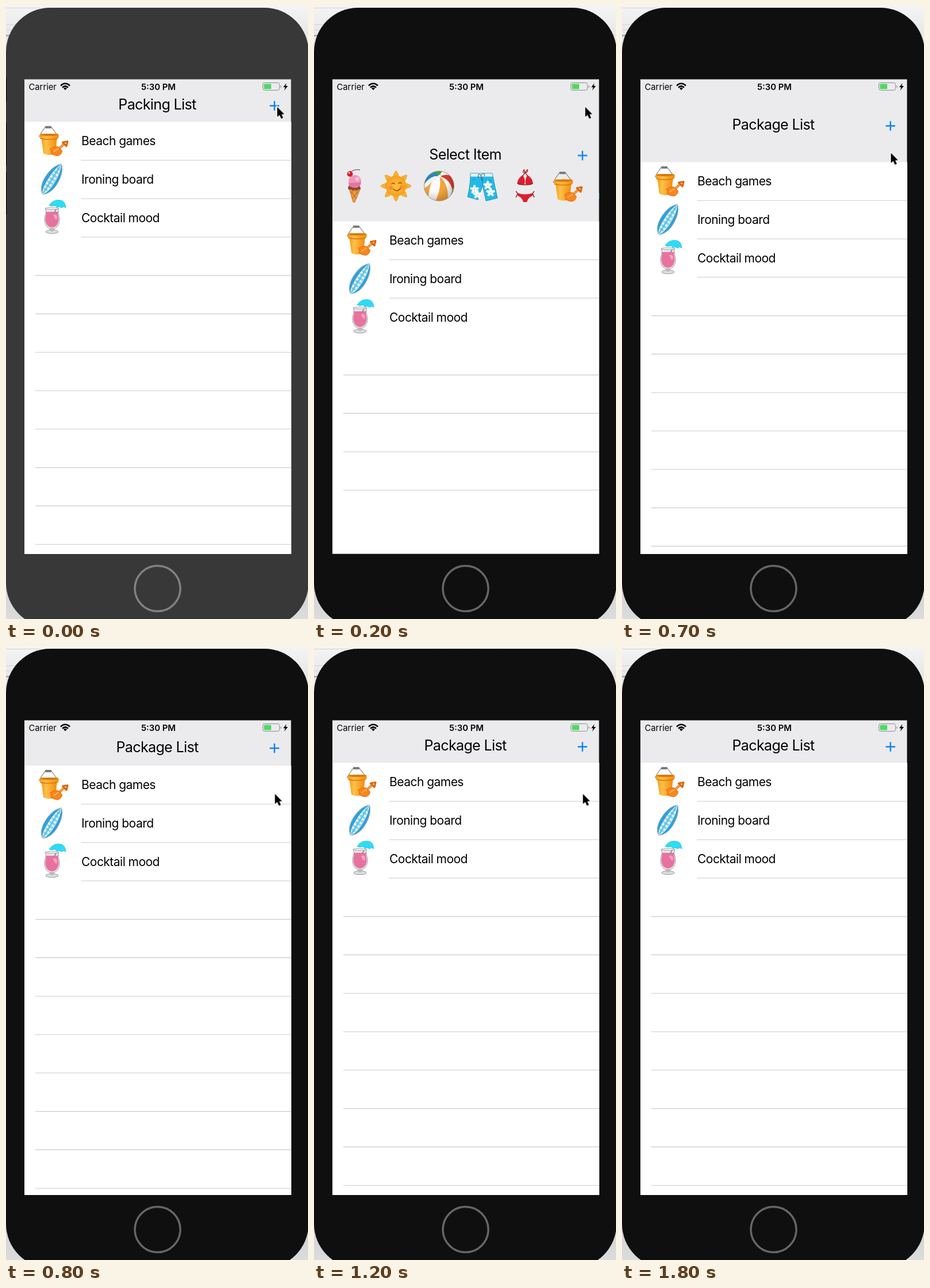
An HTML page that plays this animation: 525x1066 px, repeating every 2000 ms.

```html
<!DOCTYPE html>
<html lang="en">
<head>
<meta charset="utf-8">
<title>Packing List</title>
<style>
  @property --open { syntax: "<length>"; inherits: true; initial-value: 0px; }

  html, body { margin: 0; width: 100%; height: 100%; overflow: hidden; background: #e9e9e9; }
  svg { display: block; width: 100vw; height: 100vh; font-family: Inter, Roboto, sans-serif; }

  .screen { animation: open 2s step-end infinite; }
  .list { transform: translateY(var(--open)); }
  .bar { transform: translateY(calc(var(--open) / 2)); }

  .shell { fill: #0f0f0f; animation: shell 2s step-end infinite; }
  .ring { fill: none; stroke: #666; stroke-width: 3.5; animation: ring 2s step-end infinite; }
  .first { animation: first 2s step-end infinite; }
  .select { animation: select 2s step-end infinite; }
  .last { animation: last 2s step-end infinite; }
  .tray { animation: tray 2s step-end infinite; }
  .third { animation: third 2s step-end infinite; }
  .tail { animation: tail 2s step-end infinite; }
  .cursor { animation: cursor 2s infinite; }

  .title { font-size: 25px; letter-spacing: -.025em; text-anchor: middle; }
  .row { font-size: 21px; letter-spacing: -.025em; }
  .status { font-size: 14.8px; }
  .rule { fill: none; stroke: #cbcacd; stroke-width: 1.1; }

  @keyframes open {
    0% { --open: 0px; }
    5% { --open: 73px; }
    10% { --open: 173px; }
    35% { --open: 70px; }
    40% { --open: 5px; }
    45%, 100% { --open: 0px; }
  }
  @keyframes shell { 0% { fill: #383838; } 5%, 100% { fill: #0f0f0f; } }
  @keyframes ring { 0% { stroke: #818181; } 5%, 100% { stroke: #666; } }
  @keyframes first { 0% { opacity: 1; } 5%, 100% { opacity: 0; } }
  @keyframes select { 0% { opacity: 0; } 5% { opacity: 1; } 35%, 100% { opacity: 0; } }
  @keyframes last { 0% { opacity: 0; } 35%, 100% { opacity: 1; } }
  @keyframes tray { 0% { opacity: 0; } 10% { opacity: 1; } 35%, 100% { opacity: 0; } }
  @keyframes third { 0% { opacity: 1; } 5% { opacity: 0; } 35%, 100% { opacity: 1; } }
  @keyframes tail { 0% { opacity: 1; } 10% { opacity: 0; } 35%, 100% { opacity: 1; } }
  @keyframes cursor {
    0% { transform: translate(471.5px, 175.5px); animation-timing-function: step-end; }
    10% { transform: translate(471.5px, 175.5px); animation-timing-function: steps(4, end); }
    30% { transform: translate(467.5px, 255.5px); animation-timing-function: step-end; }
    70% { transform: translate(467.5px, 255.5px); animation-timing-function: steps(4, end); }
    90%, 100% { transform: translate(450px, 1090px); animation-timing-function: step-end; }
  }
</style>
</head>
<body>
<svg viewBox="0 0 525 1066" preserveAspectRatio="none">
  <defs>
    <clipPath id="glass"><path d="M32 127.500H495.500V952.500H32z"/></clipPath>
    <clipPath id="round"><circle r="26"/></clipPath>
    <linearGradient id="desk" x2="0" y2="1">
      <stop stop-color="#f4f4f4"/><stop offset=".06" stop-color="#e4e4e4"/>
      <stop offset=".93" stop-color="#cfcfcf"/><stop offset="1" stop-color="#dcdcdc"/>
    </linearGradient>
    <linearGradient id="pail">
      <stop stop-color="#f59a12"/><stop offset=".3" stop-color="#ffc04a"/><stop offset="1" stop-color="#f08c0c"/>
    </linearGradient>
    <radialGradient id="sunny"><stop stop-color="#ffc53a"/><stop offset="1" stop-color="#f7a01e"/></radialGradient>
    <radialGradient id="shade" cx=".4" cy=".35" r=".7">
      <stop offset=".5" stop-color="#000" stop-opacity="0"/><stop offset="1" stop-color="#000" stop-opacity=".22"/>
    </radialGradient>
    <pattern id="petals" width="7" height="7" patternUnits="userSpaceOnUse">
      <path d="M1 3.500h5M3.500 1v5" stroke="#fff" stroke-width="1.700"/>
    </pattern>
    <g id="flower" fill="#f4fcff">
      <ellipse id="leaf" cy="-4" rx="2.300" ry="4"/>
      <use href="#leaf" transform="rotate(72)"/><use href="#leaf" transform="rotate(144)"/>
      <use href="#leaf" transform="rotate(216)"/><use href="#leaf" transform="rotate(288)"/>
      <circle r="1.200" fill="#f5d36a"/>
    </g>

    <g id="bucket">
      <path d="M2 20Q4 15 12 4H24Q30 12 35 19" fill="none" stroke="#777" stroke-width="1.100"/>
      <rect x="12.500" y="1.300" width="11" height="4" rx="1.200" fill="#777"/>
      <path d="M5.500 19H33.500L30.500 49Q20 54 9.500 49z" fill="url(#pail)"/>
      <rect x="3" y="14.500" width="33" height="8.500" rx="3" fill="url(#pail)"/>
      <ellipse cx="19.500" cy="16.500" rx="15" ry="2" fill="#d9790a"/>
      <path d="M4 23Q19 26 34 23" fill="none" stroke="#dd7a0c" stroke-width="1.300"/>
      <g stroke-linejoin="round" stroke="#dd680a" fill="none">
        <path d="M36 41L46 32" stroke-width="4"/><path d="M36 41L46 32" stroke="#ff9d38" stroke-width="2.400"/>
        <path d="M43 29.500L51.500 28 49.500 36z" stroke-width="3.200"/>
        <path d="M21.500 41Q28 36 35 37.500L42 44Q42 50 35 53Q28 53 23 49Q25 44 21.500 41z" fill="#f8861e"/>
      </g>
      <path d="M27 46L36 40" stroke="#ffb35e" stroke-width="2"/>
    </g>

    <g id="surf" transform="rotate(32)">
      <path d="M0-31C9-23 12-9 12 3C12 17 7 27 0 31C-7 27-12 17-12 3C-12-9-9-23 0-31z" fill="#319fdb" stroke="#9eb2bc"/>
      <path d="M0-30C5-20 6.500-9 6.500 3C6.500 17 4 26 0 30C-4 26-5.500 17-5.500 3C-5.500-9-4-20 0-30z" fill="#74cde4"/>
      <path d="M0-30C5-20 6.500-9 6.500 3C6.500 17 4 26 0 30C-4 26-5.500 17-5.500 3C-5.500-9-4-20 0-30z" fill="url(#petals)" stroke="#e8f7fb" stroke-width=".9"/>
      <path d="M0-29V29" stroke="#4baed0" stroke-width=".8"/>
    </g>

    <g id="drink">
      <path d="M0 10L11-10" stroke="#777" stroke-width="1.300"/>
      <path d="M-5-20Q2-32 16-29Q23-27 24-16L20-18 17-16 12-18 9-17 5-20 0-19z" fill="#2cdcf6" stroke="#18b9d8" stroke-width=".7"/>
      <path d="M-12-15C-8-6-14-4-13 6C-12 17-6 19-3 21V25H3V21C6 19 12 17 13 6C14-4 8-6 12-15z" fill="#e5e4e7" stroke="#999" stroke-width=".9"/>
      <path d="M-11-9C-9-5-12-2-11.500 6C-10 14-6 18 0 18S10 14 11.500 6C12-2 9-5 11-9z" fill="#e8729f"/>
      <path d="M2-4Q7-6 9-1L8 5Q4 3 2-4z" fill="#f4a5c2"/>
      <path d="M4-8L9-17" stroke="#888" stroke-width="1.600"/>
      <ellipse cy="-15" rx="12" ry="1.700" fill="#f1f1f3" stroke="#999" stroke-width=".8"/>
      <ellipse cy="25.500" rx="11" ry="3.200" fill="#dedede" stroke="#999"/>
      <path d="M-3 19H3L2 25H-2z" fill="#bbb"/>
    </g>

    <g id="cone">
      <path d="M-8 5H12L2 29Q0 30-1 29z" fill="#e99a3d" stroke="#b86620" stroke-width=".8"/>
      <path d="M-5 10L5 23M0 6L8 15M9 8L-2 22M3 6L-5 14" stroke="#b86620" stroke-width="1"/>
      <path d="M-10 5Q-10-2 0-2T12 4Q12 8 8 7Q5 11 2 7Q-2 11-4 7Q-9 9-10 5z" fill="#8a4a32"/>
      <circle cx="2" cy="-7" r="11" fill="#f196b8"/>
      <path d="M-9-4Q-7 6-3 1Q1 7 5 1Q11 5 13-5z" fill="#e6739f"/>
      <circle cx="6" cy="-11" r="3.500" fill="#fac5d8"/>
      <path d="M-6-22Q0-29 11-27" fill="none" stroke="#5d2b25" stroke-width="1"/>
      <circle cx="-6.500" cy="-20" r="5" fill="#d6202f"/><circle cx="-8" cy="-22" r="1.300" fill="#fff"/>
    </g>

    <g id="sun">
      <g fill="#f9b22d" stroke="#ee9a20" stroke-width=".8">
        <path id="ray" d="M-4.500-18Q-4-22 0-27Q4-22 4.500-18z"/>
        <use href="#ray" transform="rotate(45)"/><use href="#ray" transform="rotate(90)"/>
        <use href="#ray" transform="rotate(135)"/><use href="#ray" transform="rotate(180)"/>
        <use href="#ray" transform="rotate(225)"/><use href="#ray" transform="rotate(270)"/>
        <use href="#ray" transform="rotate(315)"/>
      </g>
      <circle r="17.500" fill="url(#sunny)" stroke="#ee9a20"/>
      <circle cx="-9" cy="3" r="3.500" fill="#f58c3c"/><circle cx="10" cy="2" r="3.500" fill="#f58c3c"/>
      <path d="M-8-3Q-5-7-2-3M4-4Q7-8 10-4M-5 5Q2 12 8 4" fill="none" stroke="#9a4a16" stroke-width="1.400"/>
    </g>

    <g id="ball">
      <g clip-path="url(#round)">
        <circle r="26" fill="#fafafa"/>
        <path d="M1-17Q-14-19-25-4L-33-14-12-32z" fill="#2487c7"/>
        <path d="M1-17Q-8-24-15-23L-6-30H12Q3-26 1-17z" fill="#38a348"/>
        <path d="M1-17Q14-22 21-17L30-1Q25 4 23 7Q19-12 1-17z" fill="#d93a2d"/>
        <path d="M1-17Q17-3 15 23L-8 29Q5 5 1-17z" fill="#f3a33a"/>
        <path d="M1-17Q-16-6-19 20L-30 8-25-4Q-14-19 1-17z" fill="#f4f4f4"/>
        <path d="M-26 4Q-18 0-13-8Q-17 3-19 20z" fill="#f3a33a"/>
        <path d="M23 5Q23 14 15 23L30 15z" fill="#38a348"/>
        <circle r="26" fill="url(#shade)"/>
      </g>
      <circle r="26" fill="none" stroke="#a68f7c"/><circle cx="1" cy="-17" r="2.600" fill="#fff" stroke="#bbb" stroke-width=".6"/>
    </g>

    <g id="shorts">
      <path d="M-21-23H17Q21-2 26 20L6 25 0-2-8 23-26 18Q-21-4-21-23z" fill="#25b9e6" stroke="#1686b4" stroke-width=".8"/>
      <path d="M-21-23H17L18-17H-21z" fill="#dff4fa" stroke="#5aa8c0" stroke-width=".7"/>
      <path d="M0-17V-2M-18-10L-13-15M10-12L16-9" stroke="#1487b5" stroke-width=".9"/>
      <path d="M-3-20Q-9-25-7-15M-3-20Q5-26 3-18M-3-20L-1-10" fill="none" stroke="#375c69"/>
      <use href="#flower" x="-14" y="5"/><use href="#flower" x="-9" y="14"/>
      <use href="#flower" x="14" y="10"/><use href="#flower" x="9" y="-2"/>
    </g>

    <g id="bikini" fill="#d9202f">
      <path d="M-11-7Q-7-15 0-23Q7-15 11-7M-2-29L0-23L4-29M-2-28Q-6-23 0-23Q6-24 4-29" fill="none" stroke="#a91722" stroke-width="1.300"/>
      <path d="M-14-4Q-12-15-4-19Q1-11-1-3Q-8 0-14-4zM14-4Q12-15 4-19Q-1-11 1-3Q8 0 14-4z"/>
      <path d="M-13-4Q0 0 13-4" fill="none" stroke="#a91722" stroke-width="1.500"/>
      <path d="M-14 12Q0 17 14 12L13 17Q5 20 3 28H-3Q-5 20-13 17z"/>
      <path d="M-13 13L-16 9M-13 13L-16 20M13 13L16 9M13 13L16 20" stroke="#a91722" stroke-width="1.400"/>
    </g>
  </defs>

  <rect width="525" height="1066" fill="url(#desk)"/>
  <path d="M0 3.500H60M0 32.500H20M0 41.500H14" stroke="#d3d3d3"/>
  <path d="M0 51.500H9" stroke="#8f979d" stroke-width="2"/>
  <rect class="shell" y="3" width="526" height="1077" rx="77"/>
  <path d="M.5 125V167M.5 204V277M.5 289V362" stroke="#080808"/>
  <circle class="ring" cx="263.500" cy="1013" r="39.500"/>

  <g class="screen" clip-path="url(#glass)">
    <rect x="32" y="127" width="464" height="826" fill="#ebebed"/>

    <g class="bar">
      <text class="title first" x="263" y="180">Packing List</text>
      <text class="title select" x="263" y="180">Select Item</text>
      <text class="title last" x="263" y="180">Package List</text>
      <path d="M458.500 173.500H475M466.700 165.200V181.800" stroke="#0a84f5" stroke-width="2.400"/>
    </g>

    <g class="tray">
      <use href="#cone" x="69" y="312"/>
      <use href="#sun" x="142.500" y="313"/>
      <use href="#ball" x="217.500" y="313"/>
      <use href="#shorts" x="293" y="314"/>
      <use href="#bikini" x="367" y="313"/>
      <use href="#bucket" x="414" y="287"/>
      <path d="M496 325Q494 330 496 335z" fill="#319fdb" stroke="#74cde4"/>
    </g>

    <g class="list">
      <rect x="32" y="201.500" width="464" height="760" fill="#fff"/>
      <use href="#bucket" x="55.500" y="207.500"/>
      <g transform="translate(80 301)"><use href="#surf"/></g>
      <use href="#drink" x="80" y="367"/>
      <g class="row">
        <text x="131" y="242.300">Beach games</text>
        <text x="131" y="309">Ironing board</text>
        <text x="131" y="375.800">Cocktail mood</text>
      </g>
      <g class="rule">
        <path d="M130.500 268.200h365m-365 66.800h365"/>
        <path class="third" d="M130.500 401.700h365"/>
        <path d="M51 468.600h445m-445 66.800h445m-445 66.800h445m-445 66.800h445"/>
        <path class="tail" d="M51 735.800h445m-445 66.800h445m-445 66.800h445m-445 66.800h445"/>
      </g>
    </g>

    <g class="status">
      <text x="39.500" y="145.500">Carrier</text>
      <text x="265" y="145.500" text-anchor="middle" font-weight="600">5:30 PM</text>
    </g>
    <g fill="none" stroke="#000" stroke-width="2.600">
      <path d="M95 138.500Q103 131 111 138.500M98 141.700Q103 137 108 141.700"/>
      <path d="M100 143.200Q103 140.500 106 143.200L103 146.300z" fill="#000" stroke="none"/>
    </g>
    <rect x="446.500" y="133.500" width="29" height="13" rx="3" fill="none" stroke="#8b8b8d"/>
    <path d="M477.500 138Q480 140 477.500 142.500z" fill="#777"/>
    <rect x="448.500" y="135.500" width="12.500" height="9" rx="1" fill="#4cd964"/>
    <path d="M487.500 134L482 141.300H485.500L483.500 147L490 139H486.200z"/>
  </g>

  <g class="cursor">
    <path d="M0 0V17.500L4 14 7 20.500 10.300 19 7.500 12.700H12.500z" stroke="#fff" stroke-width="2.400" paint-order="stroke"/>
  </g>
</svg>
</body>
</html>
```
